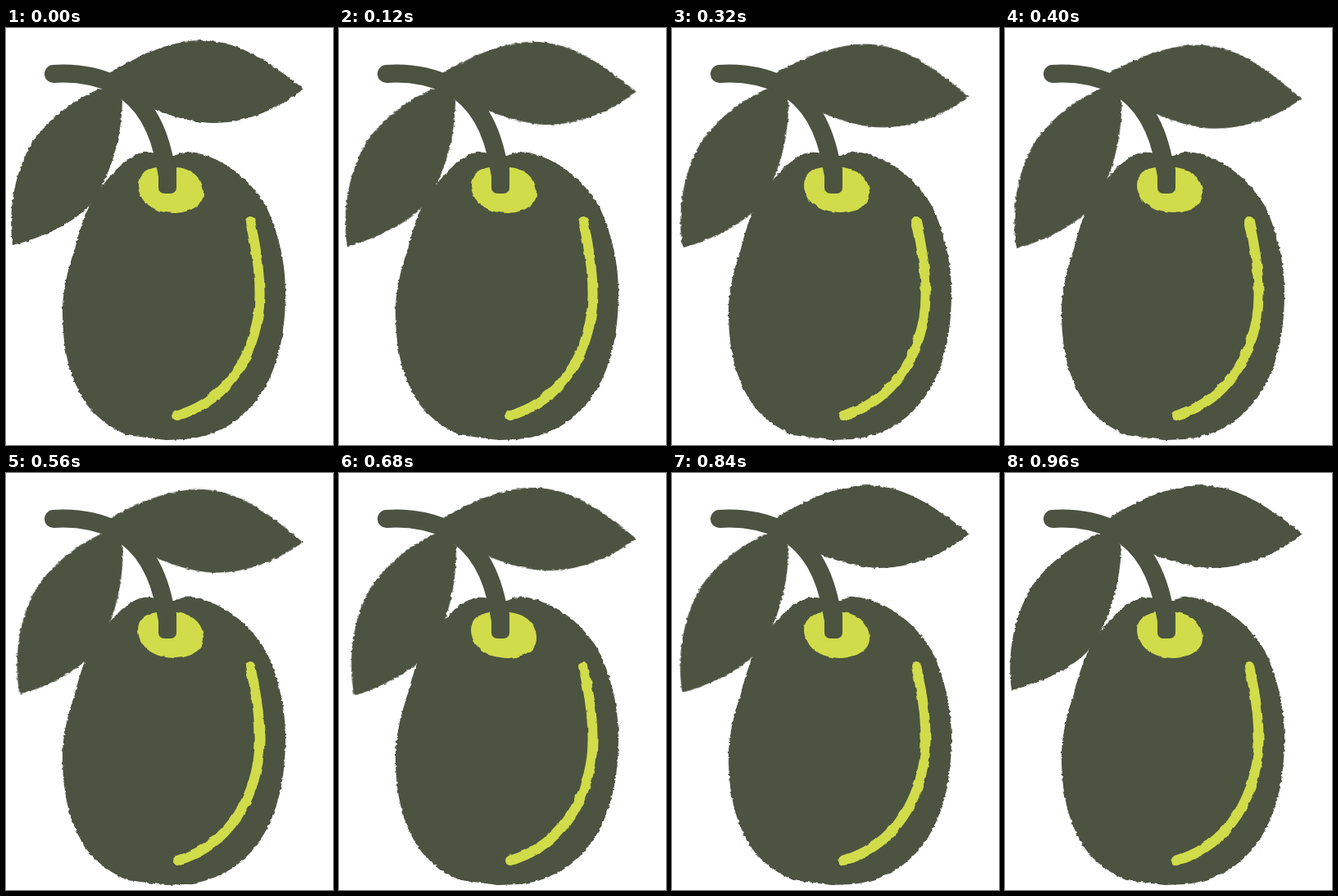
Recreate the animation shown at these times as an HTML page. Size 399 px wide and 509 px high, loop 1 s.

```html
<!DOCTYPE html>
<html>
<head>
<meta charset="utf-8">
<style>
  html, body { margin: 0; width: 100%; height: 100%; overflow: hidden; background: #fff; }
  svg { display: block; width: 100%; height: 100%; }
</style>
</head>
<body>
<svg viewBox="0 0 399 509" fill="#4c5341">
  <defs>
    <filter id="fuzzy" filterUnits="userSpaceOnUse" x="0" y="0" width="399" height="509" color-interpolation-filters="sRGB">
      <feTurbulence type="fractalNoise" baseFrequency=".2 .3" numOctaves="1"/>
      <feDisplacementMap in="SourceGraphic" scale="4" xChannelSelector="R" yChannelSelector="G"/>
    </filter>
    <filter id="lumpy" filterUnits="userSpaceOnUse" x="0" y="0" width="399" height="509" color-interpolation-filters="sRGB">
      <feTurbulence type="fractalNoise" baseFrequency=".1" numOctaves="1"/>
      <feDisplacementMap in="SourceGraphic" scale="4" xChannelSelector="R" yChannelSelector="G"/>
    </filter>
  </defs>

  <g filter="url(#fuzzy)">
    <path d="M205 156C213 152 222 150 235 153C268 161 298 185 317 217C334 252 341 290 341 322C341 365 335 402 318 435C300 468 275 488 245 497C225 503 212 502 195 503C178 501 165 499 148 497C130 489 115 479 102 464C83 439 70 405 69 352C68 325 75 295 84 270C92 238 102 208 122 187C135 172 150 155 168 152C180 150 195 157 205 156Z"/>
    <path id="left" d="M130 69C100 77 63 100 38 131C20 155 0 205 8 265C45 256 85 237 104 214C122 188 140 148 142 90Z"/>
    <path id="right" d="M122 58C160 34 200 15 240 15C288 16 325 45 363 74C330 101 290 116 253 116C222 115 195 105 178 98L140 85L120 72Z"/>
  </g>

  <g filter="url(#lumpy)" fill="#d1dc4a">
    <path d="M184 170C170 172 161 180 161 192C162 212 180 226 207 226C230 224 242 214 241 200C240 184 228 172 208 170Z"/>
    <path d="M298 236C308 280 314 330 305 365C293 416 261 458 209 473" fill="none" stroke="#d1dc4a" stroke-width="12" stroke-linecap="round"/>
  </g>

  <path d="M58 56C88 54 112 59 135 70C168 88 187 122 195 170L197 180" fill="none" stroke="#4c5341" stroke-width="22" stroke-linecap="round"/>
  <rect x="186" y="165" width="22" height="37" rx="7"/>
</svg>
<script>
  const LOOP = 1000, STEP = 40, BOIL = 160;
  const left = document.getElementById('left');
  const right = document.getElementById('right');
  const noises = document.querySelectorAll('feTurbulence');
  let seed = -1;

  // Linear rise to 1 at peak, linear fall to 0 at end
  const swing = (t, peak, end) => Math.max(0, t < peak ? t / peak : (end - t) / (end - peak));

  function draw(now) {
    const t = Math.floor(now % LOOP / STEP) * STEP;
    left.setAttribute('transform', `rotate(${-3.15 * swing(t, 680, 960)} 135 75)`);
    right.setAttribute('transform', `rotate(${3.4 * swing(t, 460, 840)} 125 57)`);
    const next = Math.min(5, Math.floor(t / BOIL)) + 1;
    if (next !== seed) {
      seed = next;
      noises.forEach(n => n.setAttribute('seed', seed));
    }
    requestAnimationFrame(draw);
  }
  draw(performance.now());
</script>
</body>
</html>
```
